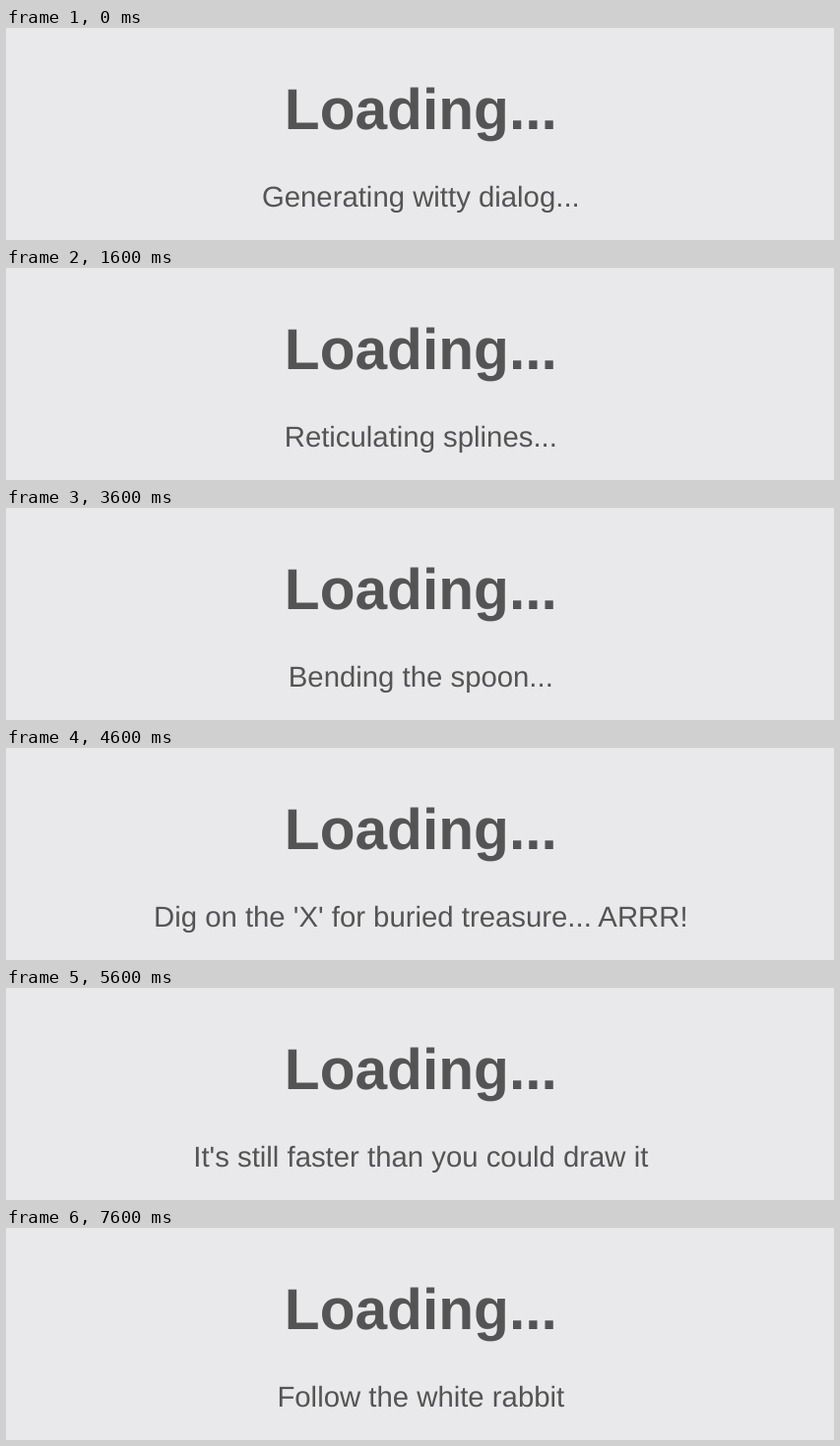
An HTML page for the animation above (8 s loop, 841x216 px).

```html
<!DOCTYPE html>
<html lang="en">
<head>
<meta charset="utf-8">
<title>Loading</title>
<style>
  html, body { margin: 0; width: 100%; height: 100%; overflow: hidden; background: #e9e9eb; }
  svg { display: block; width: 841px; height: 216px; }
  text {
    font-family: "Liberation Sans", Arial, sans-serif;
    font-size: 29.33px;
    fill: #545454;
    text-anchor: middle;
    text-rendering: geometricPrecision;
  }
  .title { font-size: 58.67px; font-weight: bold; }
</style>
</head>
<body>
<svg id="stage" viewBox="0 0 841 216">
  <text class="title" x="421.3" y="103">Loading...</text>
</svg>
<script>
const LOOP = 8000, BLEND = 200, MIX = 0.4;

// start time, length of the blend that leads in, message
const lines = [
  [0, 0, "Generating witty dialog..."],
  [600, 0, "Swapping time and space..."],
  [1600, BLEND, "Reticulating splines..."],
  [2600, BLEND, "Spinning violently around the y-axis..."],
  [3600, BLEND, "Bending the spoon..."],
  [4600, BLEND, "Dig on the 'X' for buried treasure... ARRR!"],
  [5600, BLEND, "It's still faster than you could draw it"],
  [6600, BLEND, "Counting backwards from Infinity"],
  [7600, BLEND, "Follow the white rabbit"]
];

const stage = document.getElementById("stage");

function addLine(message) {
  const el = document.createElementNS("http://www.w3.org/2000/svg", "text");
  el.setAttribute("x", 421.3);
  el.setAttribute("y", 182);
  el.textContent = message;
  stage.append(el);
  return el;
}

function fadeSteps([start, lead], next) {
  const steps = [];
  const add = (time, opacity) =>
    steps.push({ offset: time / LOOP, opacity, easing: "steps(1, end)" });
  if (start > 0) add(0, 0);
  if (lead) add(start - lead, MIX);
  add(start, 1);
  if (next) {
    if (next[1]) add(next[0] - next[1], 1 - MIX);
    add(next[0], 0);
  }
  add(LOOP, next ? 0 : 1);
  return steps;
}

lines.forEach((line, i) => {
  const anim = addLine(line[2]).animate(
    fadeSteps(line, lines[i + 1]),
    { duration: LOOP, iterations: Infinity }
  );
  anim.startTime = 0;
});
</script>
</body>
</html>
```
